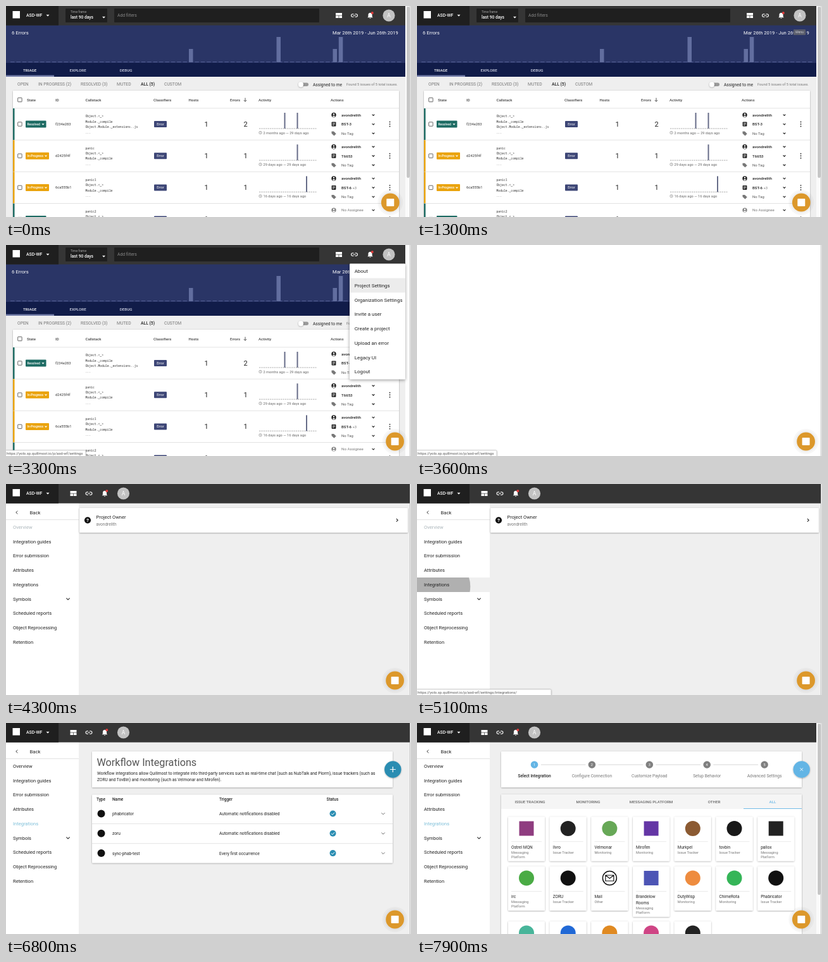
Recreate the animation shown at these times as an HTML page. Size 640 px wide and 334 px high, loop 8 s.

```html
<!DOCTYPE html>
<html lang="en">
<head>
<meta charset="utf-8">
<title>Project settings walkthrough</title>
<style>
  html, body { margin: 0; width: 100%; height: 100%; overflow: hidden; background: #fff; }
  svg { display: block; width: 100%; height: 100%; font-family: Roboto, sans-serif; }
  .mono { font-family: "Noto Sans Mono", monospace; }
</style>
</head>
<body>
<svg id="stage" viewBox="0 0 640 334" preserveAspectRatio="none"></svg>
<script>
const LOOP = 8000;
const USER = 'avondrelith';
const SITE = 'https://yolo.sp.quillmost.io/p/asd-wf/settings';
const TEAL = '#1d6b63', AMBER = '#eaa30c', BLUE = '#2a8db2', SKY = '#64b5e5', INK = '#222', GREY = '#777';

// ---------- drawing helpers: each returns SVG markup ----------
const rect = (x, y, w, h, fill, extra = '') =>
  `<rect x="${x}" y="${y}" width="${w}" height="${h}" fill="${fill}" ${extra}/>`;
const circle = (x, y, r, fill, extra = '') => `<circle cx="${x}" cy="${y}" r="${r}" fill="${fill}" ${extra}/>`;
const text = (x, y, size, str, fill = INK, extra = '') =>
  `<text x="${x}" y="${y}" font-size="${size}" fill="${fill}" ${extra}>${str.replace(/</g, '&lt;')}</text>`;
const path = (d, stroke, width = 1, extra = '') =>
  `<path d="${d}" fill="none" stroke="${stroke}" stroke-width="${width}" ${extra}/>`;
const shape = (d, fill) => `<path d="${d}" fill="${fill}"/>`;
const group = (id, body) => `<g id="${id}">${body}</g>`;
const card = (x, y, w, h) => rect(x, y, w, h, '#fff', 'rx="1" filter="url(#shadow)"');
const MEDIUM = 'font-weight="500"', BOLD = 'font-weight="700"', MIDDLE = 'text-anchor="middle"';
const chevron = (x, y, angle = 0, color = INK, s = 1.9, width = 1.1) =>
  path(`M${-s} ${-s / 2}L0 ${s / 2}L${s} ${-s / 2}`, color, width, `transform="translate(${x} ${y}) rotate(${angle})"`);
const caret = (x, y) => shape(`M${x - 2.5} ${y - 1.2}h5l-2.5 2.6z`, '#fff');
const checkbox = y => rect(18.7, y, 6.4, 6.4, 'none', 'stroke="#555" stroke-width=".9" rx=".6"');

// ---------- shared chrome ----------
function header(width, iconShift) {
  const icons =
    rect(521, 11, 10, 3.7, '#fff') + rect(521, 15.4, 4.6, 3.6, '#fff') + rect(526.3, 15.4, 4.7, 3.6, '#fff') +
    path('M549.5 12.8h-1.7a2.2 2.2 0 0 0 0 4.4h1.7M551.5 12.8h1.7a2.2 2.2 0 0 1 0 4.4h-1.7M548.4 15h4.2', '#fff', 1.1) +
    shape('M571.2 18.2l1.2-1.3v-2.7q0-3 3.1-3.4q3.1 .4 3.1 3.4v2.7l1.2 1.3zM574.3 18.9h2.4q-1.2 1.7-2.4 0z', '#fff') +
    circle(578.8, 11, 2, '#e23b3b') + circle(605, 15, 9.6, '#c2c2c2') +
    text(605, 18, 8.5, 'A', '#fff', MIDDLE);
  return rect(0, 0, width, 30.6, '#353535') + rect(0, 0, 83, 30.6, '#1f1f1f') +
    rect(10.5, 8, 11.5, 11.5, '#fff') + text(32, 17.3, 6.9, 'ASD-WF', '#fff', MEDIUM) + caret(66, 15) +
    `<g transform="translate(${iconShift} 0)">${icons}</g>`;
}

// ---------- error dashboard ----------
function issueRow(y, issue) {
  const { state, color, id, stack, errors, bars, span, owner, ticket, more = '' } = issue;
  const badgeWidth = state === 'Resolved' ? 32.5 : 37;
  return rect(11, y, 2.5, 50, color) + rect(13.5, y - .5, 607.5, .8, '#dcdcdc') + checkbox(y + 21.8) +
    rect(31, y + 19.5, badgeWidth, 11, color, 'rx="1"') +
    text(33.5, y + 26.8, 4.95, state, '#fff', MEDIUM) + chevron(26 + badgeWidth, y + 25, 0, '#fff', 1.5) +
    text(78, y + 27, 5.75, id, '#333') +
    stack.map((line, i) => text(125.5, y + 14.4 + i * 8.4, 4.77, line, '#333', 'class="mono"')).join('') +
    rect(234, y + 20, 20, 10, '#3d4676', 'rx="1"') + text(244, y + 27, 5.4, 'Error', '#fff', MIDDLE) +
    text(316.5, y + 28.8, 11, '1', INK, MIDDLE) + text(378.5, y + 28.8, 11, errors, INK, MIDDLE) +
    path(`M400 ${y + 32}H490.5`, '#999', .8, 'stroke-dasharray="2.3 1.1"') +
    bars.map(x => rect(x - 1, y + 7, 2, 25, '#666c88')).join('') +
    circle(402, y + 38.5, 2.2, 'none', 'stroke="#777" stroke-width=".6"') +
    path(`M402 ${y + 37.2}v1.4l1 .6`, GREY, .5) + text(406.5, y + 40.6, 5.64, span, '#666') +
    circle(518, y + 10.5, 3.7, owner ? '#222' : '#888') + circle(518, y + 9.3, 1.2, '#fff') +
    shape(`M515.8 ${y + 12.7}q2.2-2.2 4.4 0q-2.2 2.2-4.4 0z`, '#fff') +
    text(530, y + 12.7, 6.2, owner || 'No Assignee', owner ? INK : GREY, owner ? MEDIUM : '') +
    rect(514.6, y + 21.5, 6.8, 7, '#222', 'rx=".8"') +
    path(`M516 ${y + 23.4}h4M516 ${y + 25}h4M516 ${y + 26.6}h2.6`, '#fff', .7) +
    text(530, y + 27.3, 6.1, ticket, INK, MEDIUM) + text(547.5, y + 27.3, 5.8, more, GREY) +
    shape(`M514.5 ${y + 36.5}h3.5l3.7 3.7-3.2 3.2-4-3.7z`, '#777') +
    text(530, y + 41.8, 5.95, 'No Tag', '#555') +
    [10.5, 25, 39.5].map(dy => chevron(580.5, y + dy)).join('') +
    [-3.5, 0, 3.5].map(dy => circle(606.5, y + 25 + dy, .95, '#333')).join('');
}

function dashboard() {
  const frames = ['Object.<_>', 'Module._compile'];
  const progress = { state: 'In-Progress', color: AMBER, errors: '1', owner: USER };
  const issues = [
    { state: 'Resolved', color: TEAL, id: 'f234e283', stack: [...frames, 'Object.Module._extensions..js', '...'],
      errors: '2', bars: [440.5, 460.5], span: '2 months ago — 29 days ago', owner: USER, ticket: 'BST-3' },
    { ...progress, id: 'd2425f4f', stack: ['panic', ...frames, '...'], bars: [460.5],
      span: '29 days ago — 29 days ago', ticket: 'T6653' },
    { ...progress, id: '6ca555b1', stack: ['panic1', ...frames, '...'], bars: [475],
      span: '16 days ago — 16 days ago', ticket: 'BST-6', more: '+3' },
    { state: 'Resolved', color: TEAL, id: '', stack: ['panic2', ...frames], errors: '', bars: [], span: '', ticket: '' }
  ];
  const histogram = [[289, 21], [427.5, 40], [516.5, 21], [525.8, 40]]
    .map(([x, h]) => rect(x, 89 - h, 6.5, h, '#626e9f')).join('');
  const tabs = [[27, 'TRIAGE', '#fff'], [100.5, 'EXPLORE', '#d0d4e4'], [179.7, 'DEBUG', '#d0d4e4']]
    .map(([x, s, c]) => text(x, 103.5, 6.2, s, c, MEDIUM)).join('');
  const filters = [[18, 'OPEN'], [51, 'IN PROGRESS (2)'], [118, 'RESOLVED (3)'], [175, 'MUTED'], [213, 'ALL (5)'], [250, 'CUSTOM']]
    .map(([x, s]) => text(x, 126.4, 6.75, s, x === 213 ? INK : GREY, x === 213 ? MEDIUM : '')).join('');
  const columns = [[33, 'State'], [78, 'ID'], [125.5, 'Callstack'], [233, 'Classifiers'], [288.5, 'Hosts'], [354, 'Errors'], [399, 'Activity'], [513, 'Actions']]
    .map(([x, s]) => text(x, 150.6, 6, s, '#444', MEDIUM)).join('');
  return rect(0, 30, 631, 304, '#efefef') + rect(0, 30, 631, 60, '#2a3566') + header(631, 0) +
    rect(94, 4, 66, 22, '#1f1f1f', 'rx="1"') + text(102, 11.4, 4.9, 'Time frame', '#aaa') +
    text(102, 20, 6.7, 'last 90 days', '#fff', MEDIUM) + caret(154.5, 18) +
    rect(171, 4, 324, 22, '#1f1f1f', 'rx="1"') + text(176, 17.4, 6.8, 'Add filters', '#888') +
    text(9, 45.3, 7.7, '6 Errors', '#fff') + text(516, 45.3, 7.6, 'Mar 26th 2019 - Jun 26th 2019', '#fff') +
    path('M7 88.6H625', '#59649a', .9, 'stroke-dasharray="6.5 2.9"') + histogram +
    rect(0, 90, 631, 22, '#111c49') + tabs + rect(0, 109.5, 76, 2.5, '#737da8') + filters +
    rect(463, 121.5, 15, 5.5, '#999', 'rx="2.7"') + circle(466, 124.2, 4, '#fff', 'filter="url(#shadow)"') +
    text(485, 126.5, 6.65, 'Assigned to me') + text(538, 126.3, 5.65, 'Found 5 issues of 5 total issues.', GREY) +
    card(11, 134, 610, 210) + columns + checkbox(145.3) +
    path('M378 145.5v5.6M375.8 149l2.2 2.3 2.2-2.3', '#444', .9) +
    issues.map((issue, i) => issueRow(162 + i * 50.2, issue)).join('');
}

function accountMenu() {
  const items = ['About', 'Project Settings', 'Organization Settings', 'Invite a user', 'Create a project', 'Upload an error', 'Legacy UI', 'Logout'];
  return rect(543, 29.5, 88, 183, '#fff', 'rx="1" filter="url(#deep)"') +
    rect(543, 52.5, 88, 22.8, '#ececec', 'id="menuHover"') +
    items.map((s, i) => text(550.7, 44 + i * 22.75, 7.95, s)).join('');
}

// ---------- settings pages ----------
function sidebar() {
  const items = ['Overview', 'Integration guides', 'Error submission', 'Attributes', 'Integrations', 'Symbols', 'Scheduled reports', 'Object Reprocessing', 'Retention'];
  return rect(0, 30, 115, 304, '#fff') +
    chevron(17, 45, 90, INK, 2.5, .9) + text(37.5, 47.5, 7.7, 'Back') + rect(0, 56, 115, .8, '#ddd') +
    rect(0, 148, 115, 23, '#efefef', 'id="navHover"') +
    circle(39, 162, 0, '#b0b0b0', 'id="ripple" clip-path="url(#navRow)"') +
    items.map((s, i) => text(11, 70.8 + i * 22.77, 7.55, s, INK, `id="nav${i}"`)).join('') +
    chevron(98, 182, 0, INK, 2.6);
}

function overview() {
  return card(116, 38, 519, 39) + circle(129, 57.3, 5.1, '#111') +
    text(129, 60.2, 8, '?', '#fff', `${MIDDLE} ${BOLD}`) +
    text(142.5, 55, 7.5, 'Project Owner') + text(142.5, 65.8, 6.5, USER, GREY) + chevron(618, 57.3, -90, INK, 2.4);
}

function integrationList() {
  const auto = 'Automatic notifications disabled';
  const rows = [['phabricator', auto], ['zoru', auto], ['sync-phab-test', 'Every first occurrence']];
  return card(136, 45, 475, 57) + text(143.5, 67.8, 16.2, 'Workflow Integrations', '#555') +
    text(144, 82.3, 6.6, 'Workflow integrations allow Quillmost to integrate into third-party services such as real-time chat (such as NubTalk and Plorm), issue trackers (such as') +
    text(144, 92, 6.6, 'ZORU and TovBin) and monitoring (such as Velmonar and Mirofen).') +
    card(136, 113.5, 475, 108) +
    [[143, 'Type'], [168, 'Name'], [337, 'Trigger'], [506.5, 'Status']]
      .map(([x, s]) => text(x, 123.3, 6.5, s, INK, MEDIUM)).join('') +
    rows.map(([name, trigger], i) => {
      const y = 143.5 + i * 31.3;
      return (i ? rect(136, y - 15.7, 475, .8, '#ddd') : '') +
        circle(150.5, y, 6, '#111') + text(168, y + 2.5, 6.65, name) + text(337, y + 2.5, 6.65, trigger) +
        circle(516.5, y, 5, BLUE) + path(`M514 ${y}l1.8 1.9 3.4-3.6`, '#fff', 1) +
        chevron(596, y, 0, '#444', 2.6, .8);
    }).join('');
}

function serviceTile(x, y, [name, kind, color, mark]) {
  const names = name.split('|'), kinds = kind.split('|');
  const cx = x + 29, cy = y + 18.5;
  const icon = mark === 'square' ? rect(cx - 11.5, cy - 11.5, 23, 23, color)
    : mark === 'mail' ? circle(cx, cy, 11, '#fff', 'stroke="#111" stroke-width="1.5"') +
      path(`M${cx - 6.5} ${cy - 4.5}h13v9h-13zl6.5 5 6.5-5`, '#111', 1.2)
    : circle(cx, cy, 12, color);
  return card(x, y, 58, 60.3 + names.length * 9.7) + icon + rect(x + 5, y + 39, 48, .6, '#ddd') +
    names.map((s, i) => text(x + 5, y + 50.3 + i * 9.7, 6.5, s)).join('') +
    kinds.map((s, i) => text(x + 5, y + 48.3 + names.length * 9.7 + i * 7, 5.6, s, GREY)).join('');
}

function integrationPicker() {
  const steps = ['Select Integration', 'Configure Connection', 'Customize Payload', 'Setup Behavior', 'Advanced Settings'];
  const tabs = [[178.5, 'ISSUE TRACKING'], [270.5, 'MONITORING'], [370, 'MESSAGING PLATFORM'], [469.5, 'OTHER'], [562, 'ALL']];
  const chat = 'Messaging|Platform', tracker = 'Issue Tracker', monitor = 'Monitoring';
  const services = [
    ['Ostrel MQN', chat, '#8f3d80', 'square'], ['Ilvro', tracker, '#222'], ['Velmonar', monitor, '#67a857'],
    ['Mirofen', monitor, '#6436a5', 'square'], ['Murkpel', tracker, '#8b5a32'], ['tovbin', tracker, '#191919'],
    ['pallox', chat, '#222', 'square'],
    ['irc', chat, '#4aab45'], ['ZORU', tracker, '#111'], ['Mail', 'Other', '', 'mail'],
    ['Brandelow|Rooms', chat, '#4d55b5', 'square'], ['DutyWisp', monitor, '#ee8c3f'], ['ChimeRota', monitor, '#35b558'],
    ['Phabricator', tracker, '#111'],
    ['', '', '#48b59a'], ['', '', '#2169d6'], ['', '', '#e08a22'], ['', '', '#cf4585'], ['', '', '#222']
  ];
  const tops = [148.5, 227, 314];
  return card(133, 45, 475, 57) + path('M196 66H539', '#ccc', .8) +
    steps.map((s, i) => {
      const x = 185.5 + i * 90.9;
      return rect(x - 10, 64, 20, 4, '#fff') + circle(x, 66, 5.8, i ? '#808080' : SKY) +
        text(x, 68, 5.6, String(i + 1), '#fff', MIDDLE) +
        text(x, 86.2, 6.6, s, i ? GREY : INK, `${MIDDLE} ${i ? '' : MEDIUM}`);
    }).join('') +
    card(133, 113, 475, 230) + rect(133, 113, 475, 23, '#f5f5f5') + rect(516, 135, 92, .9, SKY) +
    tabs.map(([x, s]) => text(x, 127.2, 6.2, s, s === 'ALL' ? SKY : '#666', `${MIDDLE} ${MEDIUM}`)).join('') +
    services.map((service, i) => serviceTile(144 + (i % 7) * 65.7, tops[Math.floor(i / 7)], service)).join('');
}

// ---------- stage ----------
const filter = (id, dy, blur, alpha) =>
  `<filter id="${id}" x="-20%" y="-20%" width="140%" height="150%"><feDropShadow dx="0" dy="${dy}" stdDeviation="${blur}" flood-opacity="${alpha}"/></filter>`;
const stage = document.getElementById('stage');
stage.innerHTML =
  `<defs>${filter('shadow', .7, .8, .35)}${filter('deep', 1.5, 2.5, .4)}<clipPath id="navRow">${rect(0, 148, 115, 23, '#000')}</clipPath></defs>` +
  rect(0, 0, 640, 334, '#fff') +
  group('dashboard', dashboard() +
    group('tooltip', rect(595, 37, 19, 9, '#5c5f6b', 'rx="1"') + text(604.5, 43.4, 5, 'Menu', '#ddd', MIDDLE)) +
    group('menu', accountMenu())) +
  group('settings', rect(115, 30, 523, 304, '#efefef') + sidebar() + header(638, -419.5) +
    group('overview', overview()) + group('list', integrationList()) + group('picker', integrationPicker()) +
    group('action', circle(0, 0, 13.2, BLUE, 'id="actionDisc" filter="url(#shadow)"') +
      path('M-4.5 0H4.5M0-4.5V4.5', '#fff', 1.2, 'id="actionSign"'))) +
  group('scrollbar', rect(631, 0, 7.5, 334, '#fafafa') + rect(633.3, 1, 4.3, 271, '#c3c3c3', 'rx="2"')) +
  rect(638.2, 0, .9, 334, '#aaa') +
  group('chat', circle(0, 0, 20, '#000', 'opacity=".03"') + circle(0, 0, 17, '#000', 'opacity=".03"') +
    circle(0, 0, 14.4, '#dc982b') + rect(-6, -6, 12, 12, '#fff', 'rx="1"')) +
  group('status', rect(-1, 325, 127, 10, '#fff', 'id="statusBox" rx="1.5" stroke="#bbb" stroke-width=".7" filter="url(#shadow)"') +
    text(1, 332, 5.95, SITE, '#555', 'id="statusText"'));

const el = Object.fromEntries([...stage.querySelectorAll('[id]')].map(node => [node.id, node]));
const show = (name, visible) => el[name].style.display = visible ? '' : 'none';
const set = (name, attrs) => { for (const key in attrs) el[name].setAttribute(key, attrs[key]); };
const ramp = (t, from, to) => Math.min(1, Math.max(0, (t - from) / (to - from)));
const easeOut = p => 1 - (1 - p) ** 3;
const between = (t, from, to) => t >= from && t < to;

function render(t) {
  const picking = t >= 7200, listed = t >= 5500;

  show('dashboard', t < 3500);
  show('tooltip', between(t, 1000, 1700));
  set('tooltip', { opacity: ramp(t, 1000, 1300) * .9 });
  show('menu', t >= 1700);
  const scale = easeOut(ramp(t, 1600, 2000));
  set('menu', { transform: `translate(631 30) scale(${scale}) translate(-631 -30)`, opacity: scale });
  show('menuHover', t >= 2600);

  show('settings', t >= 3800);
  show('overview', t < 5400);
  show('list', listed && !picking);
  show('picker', picking);
  show('navHover', between(t, 4600, 5800));
  set('ripple', { r: 45 * ramp(t, 4950, 5100) + 45 * ramp(t, 5100, 5250), opacity: 1 - ramp(t, 5250, 5500) });
  set('nav0', { fill: t < 5300 ? '#aab5ba' : INK });
  set('nav4', { fill: t < 5300 ? INK : '#7dbfd9' });

  show('action', listed);
  const turn = easeOut(ramp(t, 7000, 7300));
  set('action', { transform: `translate(${picking ? 607.7 : 611.3} 73.5)` });
  set('actionSign', { transform: `rotate(${45 * turn}) scale(${1 - .3 * turn})` });
  set('actionDisc', { fill: `rgb(${42 + 58 * turn},${141 + 40 * turn},${178 + 51 * turn})` });

  const scrollable = t < 1700 || picking;
  show('scrollbar', scrollable);
  set('chat', { transform: `translate(${scrollable ? 607.3 : 614.6} 311)` });

  const deepLink = t >= 4600;
  show('status', between(t, 2600, 3900) || between(t, 4600, 5800));
  set('statusBox', { width: deepLink ? 213 : 127 });
  el.statusText.textContent = SITE + (deepLink ? '/integrations/' : '');
}

const start = performance.now();
function tick() {
  render((performance.now() - start) % LOOP);
  requestAnimationFrame(tick);
}
tick();
</script>
</body>
</html>
```
